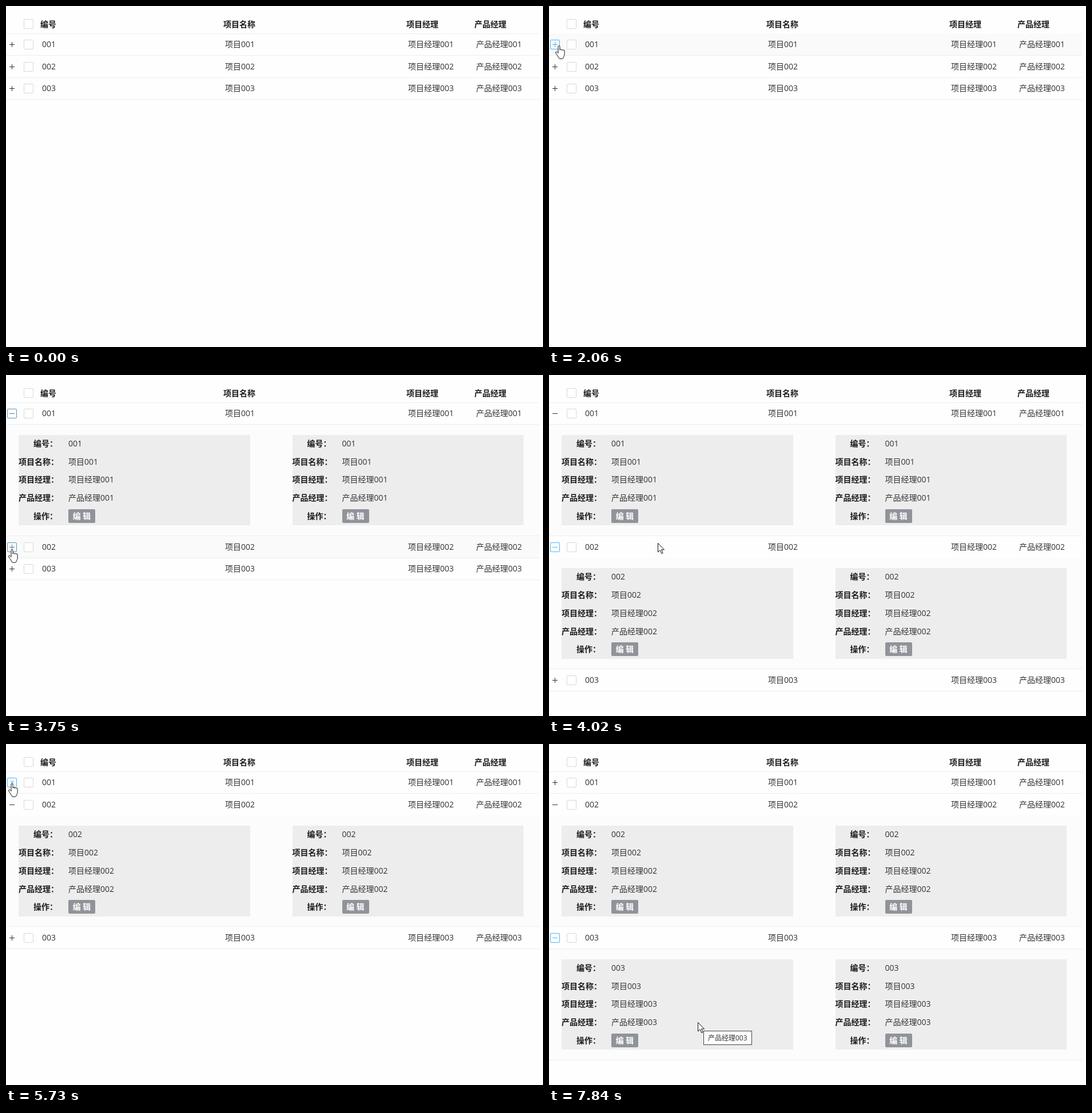
These frames come from a looping animation (939 by 597 pixels, 8 s). An HTML page:

```html
<!DOCTYPE html>
<html lang="zh-CN">
<head>
<meta charset="utf-8">
<title>项目列表</title>
<style>
  html, body { margin: 0; width: 100%; height: 100%; overflow: hidden; background: #fefefe; }
  body { position: relative; font: 14px/20px "Open Sans", "Noto Sans CJK SC", "Noto Sans CJK", sans-serif; color: #333; }
  body * { position: absolute; box-sizing: border-box; white-space: pre; }
  b { color: #1c1c1c; }
  .row { left: 0; width: 933px; height: 39px; border-bottom: 1px solid #ebeeef; }
  .head { top: 0; height: 48.5px; }
  .hover { background: #fafafa; }
  .check { left: 31px; width: 17px; height: 17px; border: 1px solid #d7d8dc; border-radius: 2px; background: #fff; }
  .icon { left: 2px; top: 11px; width: 17px; height: 17px; border: 1px solid transparent; border-radius: 2px; }
  .icon i { left: 3px; top: 7px; width: 9px; height: 1px; background: currentColor; }
  .icon i + i { transform: rotate(90deg); }
  .icon.minus i + i { display: none; }
  .icon.spin { transform: none; }
  .icon.spin i { width: 8px; left: 3.5px; transform: rotate(52deg); }
  .icon.spin i + i { display: block; transform: rotate(-52deg); }
  .detail { left: 0; width: 933px; height: 195px; border-bottom: 1px solid #ebeeef; background: #fcfcfc; }
  .panel { top: 18px; width: 404.5px; height: 158.5px; background: #ededed; }
  .edit { left: 87px; width: 47px; height: 24px; line-height: 24px; border-radius: 2px; background: #909399; color: #fff; text-align: center; }
  #tip { width: max-content; height: 25px; padding: 0 7px; border: 1px solid #444; background: #fff; font-size: 12px; line-height: 23px; }
  svg { overflow: visible; fill: #fff; stroke: #111; stroke-width: 1; }
</style>
</head>
<body>
<div class="row head"></div>
<div id="rows"></div>
<div id="tip"></div>
<svg id="arrow" width="12" height="19"><path d="M.5.5V16l3.6-3.4 2.7 6 2.3-1-2.6-5.8h5z"/></svg>
<svg id="hand" width="17" height="24"><path d="M5 13.5V2.2a1.5 1.5 0 0 1 3 0V8a1.4 1.4 0 0 1 2.8.4 1.4 1.4 0 0 1 2.7.6 1.3 1.3 0 0 1 2.6.8v5.700c0 2.500-1.600 3.500-1.600 5.500q-.5 2.500-4.500 2.500t-4.500-2.500C4.500 18 2 16 .7 13 .2 11 2.200 10.300 3.200 11.600z"/></svg>
<script>
const $ = id => document.getElementById(id);
const LOOP = 8000;
const fields = [["编号", 60, ""], ["项目名称", 380, "项目"], ["项目经理", 700, "项目经理"], ["产品经理", 819, "产品经理"]];

function add(parent, tag, cls = "", text = "", x, y) {
  const el = document.createElement(tag);
  el.className = cls;
  el.textContent = text;
  if (x !== undefined) el.style.left = x + "px";
  if (y !== undefined) el.style.top = y + "px";
  return parent.appendChild(el);
}

const head = document.querySelector(".head");
add(head, "span", "check").style.top = "23px";
for (const [title, x] of fields) add(head, "b", "", title, x, 21.5);

function addPanel(parent, x, code) {
  const panel = add(parent, "div", "panel", "", x);
  const lineTop = i => 5.4 + i * 31.7;
  fields.forEach(([title, , prefix], i) => {
    add(panel, "b", "", title + "：", i ? 0 : 26, lineTop(i));
    add(panel, "span", "", prefix + code, 87, lineTop(i));
  });
  add(panel, "b", "", "操作：", 26, lineTop(4));
  add(panel, "b", "edit", "编 辑", undefined, lineTop(4) - 2);
}

const rows = [1, 2, 3].map(n => {
  const code = "00" + n;
  const row = add($("rows"), "div", "row");
  const icon = add(row, "span", "icon");
  add(icon, "i");
  add(icon, "i");
  add(row, "span", "check").style.top = "11px";
  for (const [, x, prefix] of fields) add(row, "span", "", prefix + code, x + 3, 9);
  const detail = add($("rows"), "div", "detail");
  addPanel(detail, 22, code);
  addPanel(detail, 500.5, code);
  return { row, icon, detail };
});

// Each step inherits the previous one: pointer kind, position, then changes.
// focus holds the highlight strength of each row's icon.
const steps = [];
function step(t, pointer, x, y, change = {}) {
  steps.push({ ...steps.at(-1), spin: -1, tip: "", hover: -1, t, pointer, x, y, ...change });
}
step(0, "", 0, 0, { open: [0, 0, 0], focus: [0, 0, 0] });
step(430, "arrow", 857, 425);
step(550, "arrow", 526, 478);
step(700, "arrow", 360, 372);
step(820, "arrow", 185, 272);
step(940, "arrow", 70, 195);
step(1060, "hand", 8, 136);
step(1210, "hand", 1, 86);
step(1360, "hand", 2, 77);
step(1510, "hand", 8, 71, { focus: [.5, 0, 0] });
step(1660, "hand", 8, 71, { focus: [1, 0, 0] });
step(2060, "hand", 11, 69, { hover: 0 });
step(2180, "arrow", 23, 50, { open: [1, 0, 0], spin: 0 });
step(2330, "arrow", 25, 50);
step(2700, "arrow", 60, 79);
step(2850, "arrow", 145, 133);
step(3000, "arrow", 205, 180);
step(3120, "arrow", 243, 230);
step(3240, "arrow", 225, 268);
step(3360, "arrow", 110, 298);
step(3480, "arrow", 19, 310);
step(3630, "hand", 4, 305);
step(3750, "hand", 4, 305, { focus: [.6, .6, 0], hover: 1 });
step(3870, "hand", 4, 305, { open: [1, 1, 0], focus: [0, 1, 0], spin: 1 });
step(4020, "arrow", 190, 294);
step(4140, "arrow", 385, 287);
step(4510, "arrow", 385, 287, { tip: "项目002" });
step(5070, "arrow", 229, 151);
step(5190, "arrow", 105, 108);
step(5310, "arrow", 29, 77);
step(5460, "hand", 4, 69, { focus: [.6, .6, 0] });
step(5580, "hand", 4, 69, { focus: [1, 0, 0] });
step(5730, "hand", 4, 69, { open: [0, 1, 0], spin: 0 });
step(5850, "hand", 4, 69);
step(6000, "arrow", 4, 110);
step(6120, "arrow", 6, 180);
step(6240, "arrow", 9, 270);
step(6360, "arrow", 12, 350);
step(6480, "arrow", 12, 394);
step(6600, "arrow", 0, 335);
step(6750, "", 0, 335);
step(6900, "hand", 2, 335, { focus: [.6, 0, .6] });
step(7020, "hand", 2, 335, { focus: [0, 0, 1] });
step(7170, "hand", 2, 335, { open: [0, 1, 1], spin: 2 });
step(7290, "arrow", 150, 420);
step(7440, "arrow", 260, 487);
step(7840, "arrow", 260, 487, { tip: "产品经理003" });

function place(el, shown, x, y) {
  el.style.display = shown ? "block" : "none";
  el.style.left = x + "px";
  el.style.top = y + "px";
}

function tint(k, alpha) {
  const mix = [[51, 80], [51, 178], [51, 250]].map(([a, b]) => a + (b - a) * k);
  return `rgba(${mix}, ${alpha})`;
}

function show(s) {
  let top = 48;
  rows.forEach(({ row, icon, detail }, i) => {
    const k = s.focus[i];
    row.style.top = top + "px";
    row.classList.toggle("hover", s.hover === i);
    icon.className = "icon" + (s.open[i] ? " minus" : "") + (s.spin === i ? " spin" : "");
    icon.style.color = tint(k, 1);
    icon.style.borderColor = tint(k, Math.min(1, k * 1.4));
    top += 38.5;
    place(detail, s.open[i], 0, top);
    if (s.open[i]) top += 195;
  });
  for (const kind of ["arrow", "hand"]) place($(kind), s.pointer === kind, s.x, s.y);
  $("tip").textContent = s.tip;
  place($("tip"), s.tip, s.x + 10, s.y + 15);
}

let start, current;
function tick(now) {
  start ??= now;
  const t = (now - start) % LOOP;
  const next = steps.findLast(s => s.t <= t);
  if (next !== current) show(current = next);
  requestAnimationFrame(tick);
}
show(current = steps[0]);
requestAnimationFrame(tick);
</script>
</body>
</html>
```
